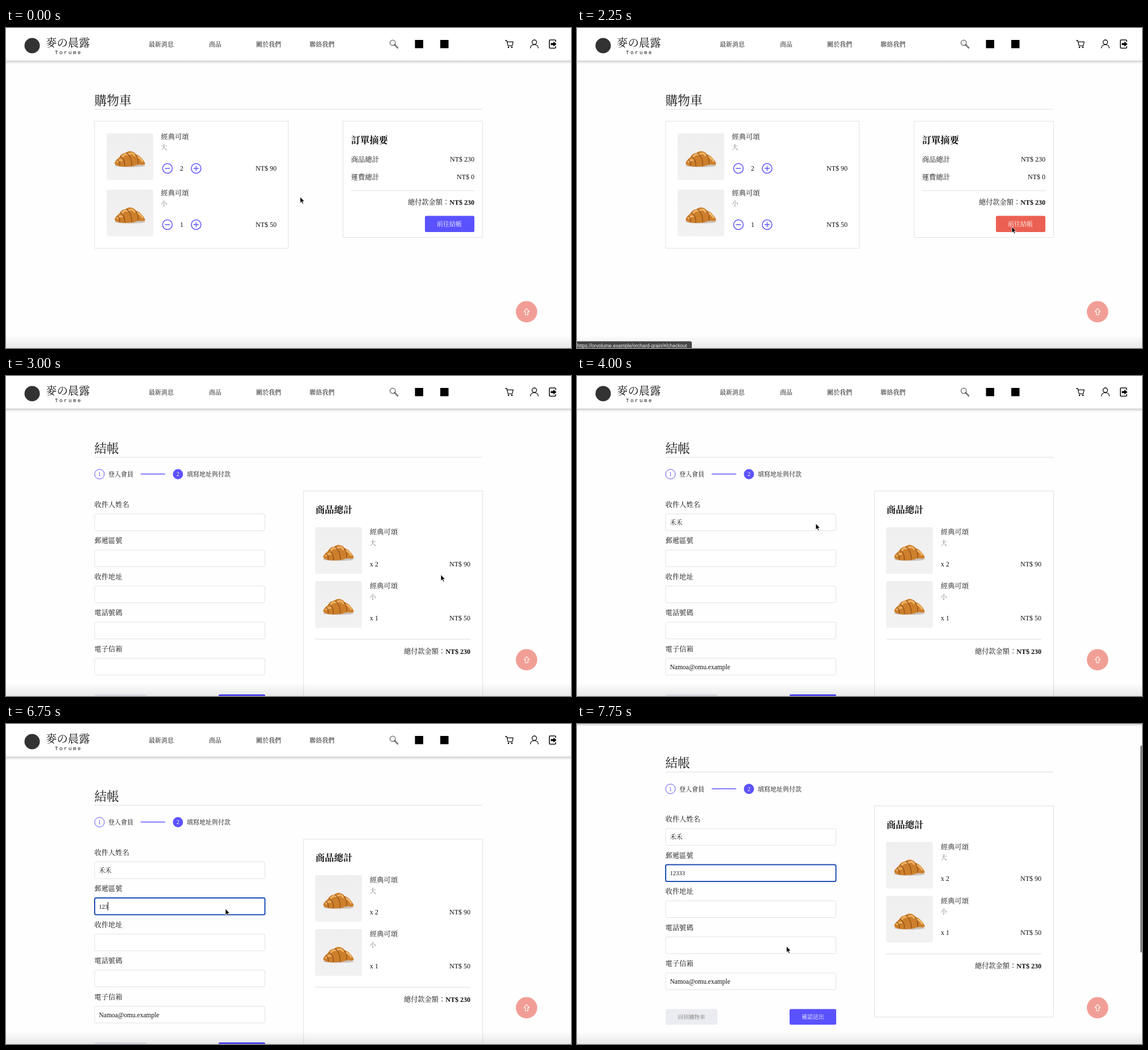
Recreate the animation shown at these times as an HTML page. Size 994 by 563 pixels, loop 8000 ms.

```html
<!DOCTYPE html>
<html lang="zh-Hant">
<head>
<meta charset="utf-8">
<title>購物車</title>
<style>
  html, body { margin: 0; width: 100%; height: 100%; overflow: hidden; background: #fefefe; }
  svg { display: block; font-family: 'Liberation Serif', 'Noto Serif CJK TC', 'Noto Sans CJK TC', 'Noto Sans CJK', serif; }
  text { white-space: pre; }
</style>
</head>
<body>
<svg id="stage" width="994" height="563" viewBox="0 0 994 563"></svg>
<script>
const PURPLE = '#5b52ff', CORAL = '#eb6052', BORDER = '#e2e2e2', INK = '#111';
const LOOP = 8000, SCROLL = 58.5;

// y is the vertical centre of the line of text
const text = (x, y, size, content, attrs = '') =>
  `<text x="${x}" y="${y + size * 0.36}" font-size="${size}" fill="${INK}" ${attrs}>${content}</text>`;
const right = (x, y, content, attrs = '') => text(x, y, 12, content, 'text-anchor="end" ' + attrs);
const middle = (x, y, size, content, color) =>
  text(x, y, size, content, `text-anchor="middle" style="fill:${color}"`);
const box = (x, y, w, h, fill, attrs = '') =>
  `<rect x="${x}" y="${y}" width="${w}" height="${h}" fill="${fill}" ${attrs}/>`;
const frame = (x, y, w, h, radius = 0, attrs = '') =>
  box(x, y, w, h, '#fff', `stroke="${BORDER}" rx="${radius}" ${attrs}`);
const rule = (x1, x2, y, color = '#dedede', width = 1) =>
  `<path d="M${x1} ${y}H${x2}" stroke="${color}" stroke-width="${width}"/>`;
const ring = (x, y, fill, width = 1) =>
  `<circle cx="${x}" cy="${y}" r="8.5" fill="${fill}" stroke="${PURPLE}" stroke-width="${width}"/>`;
const line = (d, width = 1.3, color = INK) =>
  `<path d="${d}" fill="none" stroke="${color}" stroke-width="${width}" stroke-linejoin="round" stroke-linecap="round"/>`;
const medium = 'font-weight="500"', bold = 'font-weight="600"';

const photo = (x, y) => `<g transform="translate(${x} ${y})">
  ${box(0, 0, 82, 82, 'url(#photo)', 'rx="3"')}
  <ellipse cx="41" cy="56.5" rx="27" ry="2.8" fill="#c9c2bc"/>
  <path d="M14 53C15 46 22 44 25 38C29 34 33 35 35 33C41 29 49 32 52 37C59 39 65 46 68 53C67 57 60 54 56 55C51 55 49 58 43 58C33 59 17 59 14 53Z" fill="#cd7f2b"/>
  <path d="M27 42Q30 36 36 37M38 37Q45 32 49 39M54 41Q60 43 63 49M19 50Q22 46 27 47" fill="none" stroke="#eeb467" stroke-width="3" stroke-linecap="round"/>
  <path d="M24 40Q33 46 32 58M35 34Q45 43 44 57M51 37Q57 46 55 54M19 46Q24 50 23 57" fill="none" stroke="#8d4b17" stroke-width="1.2"/>
</g>`;

const product = (x, y, size) =>
  text(x, y, 12.3, '經典可頌', medium) + text(x, y + 19, 11, size, 'style="fill:#777"');

const total = (x, y) =>
  text(x - 117, y, 12.2, '總付款金額：') + right(x, y, 'NT$ 230', bold);

const cartRow = (y, size, count, price) =>
  photo(177, y) + product(272.5, y + 6, size) +
  ring(284, y + 61.5, 'none', 1.5) + ring(334.5, y + 61.5, 'none', 1.5) +
  line(`M280 ${y + 61.5}h8M330.5 ${y + 61.5}h8m-4 -4v8`, 1.4, PURPLE) +
  middle(309, y + 61.5, 12, count, INK) + right(476, y + 61.5, price);

const checkoutRow = (y, size, count, price) =>
  photo(544, y) + product(640, y + 9, size) +
  text(640, y + 64.5, 12, 'x ' + count) + right(817, y + 64.5, price);

const heading = title => text(155.5, 127, 21.7, title) + rule(156, 838, 143);

const cartPage = heading('購物車') +
  frame(156, 164, 340.5, 223.5) +
  cartRow(185.5, '大', 2, 'NT$ 90') + cartRow(284.5, '小', 1, 'NT$ 50') +
  frame(593, 164, 245.5, 204.5) +
  text(607, 197, 16.3, '訂單摘要', bold) +
  text(607, 231.5, 12.3, '商品總計') + right(824, 231, 'NT$ 230') +
  text(607, 262.5, 12.3, '運費總計') + right(824, 262, 'NT$ 0') +
  rule(607, 824, 286) + total(824, 307) +
  box(737, 330.5, 87, 28.5, PURPLE, 'rx="2.5" id="pay"') + middle(780, 345, 11, '前往結帳', '#fff');

const fields = ['收件人姓名', '郵遞區號', '收件地址', '電話號碼', '電子信箱'].map((label, i) =>
  text(155.5, 226.5 + i * 63.5, 12.3, label) +
  frame(156, 242.5 + i * 63.5, 299.5, 29.5, 2.5, `id="field${i}"`)).join('');

const checkoutPage = heading('結帳') +
  ring(164.5, 172.7, 'none') + middle(164.5, 172.7, 10, 1, PURPLE) + text(180, 173.5, 11, '登入會員') +
  rule(237, 280, 172.5, PURPLE, 1.6) +
  ring(302.5, 172.7, PURPLE) + middle(302.5, 172.7, 10, 2, '#fff') + text(318, 173.5, 11, '填寫地址與付款') +
  fields +
  `<g id="autofill">${text(163.5, 258, 11, '禾禾') + text(163.5, 511.5, 11.5, 'Namoa@omu.example')}</g>` +
  text(163.5, 321, 10.5, '', 'id="zip"') + box(163, 313, 1, 15, INK, 'id="caret"') +
  frame(523.5, 202.5, 315, 371.5) + text(544.5, 235.5, 16.3, '商品總計', bold) +
  checkoutRow(266, '大', 2, 'NT$ 90') + checkoutRow(361, '小', 1, 'NT$ 50') +
  rule(544, 817, 463) + total(817, 484.5) +
  box(156, 560, 91, 27.5, '#ebebf2', 'rx="2.5"') + middle(201.5, 574.5, 9.6, '回到購物車', '#777') +
  box(374, 560, 82, 27.5, PURPLE, 'rx="2.5"') + middle(415, 574.5, 9.7, '確認送出', '#fff');

const header = box(0, 57, 994, 6, 'url(#shadow)') + box(0, 0, 994, 57.3, '#fff') +
  '<circle cx="46" cy="31" r="13.5" fill="#333"/>' +
  text(70, 26.5, 19.4, '麥の晨露', 'font-weight="300"') +
  text(86, 42.5, 9, 'Torume', `font-family="'Liberation Mono', monospace" letter-spacing="2.6"`) +
  [[251, '最新消息'], [357, '商品'], [440, '關於我們'], [534, '聯絡我們']]
    .map(([x, label]) => text(x, 29, 11, label)).join('') +
  '<circle cx="680.3" cy="26" r="4.7" fill="none" stroke="#555" stroke-width="1.2"/>' +
  line('M684 29.5L689 34.8', 2.6, '#555') + line('M685 30.5L688.6 34.3', 0.9, '#ddd') +
  box(719.5, 21, 14.5, 14.5, '#000') + box(764, 21, 14.5, 14.5, '#000') +
  line('M878.5 22H881L883.3 31.3H890.5L892.2 24.3H881.7') +
  '<circle cx="884" cy="34" r="1.3"/><circle cx="890" cy="34" r="1.3"/>' +
  line('M925.5 25a4 4 0 1 0 8 0a4 4 0 1 0 -8 0M922.6 35C923 27.5 936 27.5 936.4 35', 1.4) +
  line('M967 24V22.5Q967 21 965.5 21H957.5Q956 21 956 22.5V34Q956 35.5 957.5 35.5H965.5Q967 35.5 967 34V32.5', 1.6) +
  '<path d="M958.5 26.5H963V23.8L968.5 28.3L963 32.8V30H958.5Z"/>';

const gradient = (id, from, to) => `<linearGradient id="${id}" x2="0" y2="1">
  <stop stop-color="${from}"/><stop offset="1" stop-color="${to}"/></linearGradient>`;

const stage = document.getElementById('stage');
stage.innerHTML = `<defs>
    ${gradient('photo', '#f0efef', '#f3f2f2')}
    ${gradient('shadow', 'rgba(0,0,0,.2)', 'rgba(0,0,0,0)')}
    ${gradient('floor', 'rgba(0,0,0,0)', 'rgba(0,0,0,.085)')}
  </defs>
  <g id="page"><g id="cart">${cartPage}</g><g id="checkout">${checkoutPage}</g>${header}</g>
  ${box(0, 540, 994, 23, 'url(#floor)')}
  <circle cx="915.8" cy="499.2" r="18.8" fill="#f19f96"/>
  ${line('M916 493.7L920.7 499H918.2V504.5H913.8V499H911.3Z', 1.1, '#fff')}
  ${box(991, 38, 6, 364, '#858585', 'rx="2" id="scrollbar"')}
  <g id="status">${box(-4, 551.3, 206, 16, '#454545', 'rx="3"')}
    ${text(0, 559, 8.6, 'https://orvolume.example/orchard-grain/#/checkout',
      `font-family="'Liberation Sans', sans-serif" style="fill:#f2f2f2"`)}</g>
  <path id="cursor" d="M0 0V11L2.5 8.7L4.2 12.5L6 11.7L4.3 8H7.7Z" stroke="#fff" stroke-width=".8"/>`;

const el = Object.fromEntries([...stage.querySelectorAll('[id]')].map(node => [node.id, node]));

const cursorSteps = [
  [0, 517.5, 297], [1250, 540, 294], [1500, 730, 293], [1750, 767, 330], [2000, 765, 349.5],
  [3250, 653, 352], [3500, 505, 325], [3750, 438, 284], [4000, 420, 259.5], [4250, 397, 297],
  [4500, 386, 325], [7500, 368.5, 391]];
const typingSteps = [[0, ''], [6000, '1'], [6250, '12'], [6750, '123'], [7000, '12333']];
const statusSteps = [[0, 0], [2250, 1], [2750, 0.4], [3000, 0]];

const stepAt = (steps, t) => steps.filter(([start]) => t >= start).pop().slice(1);
const show = (node, visible) => node.setAttribute('display', visible ? 'inline' : 'none');

function render(now) {
  const t = now % LOOP;
  const scrolled = t >= 7750, focused = t >= 4750;
  const [typed] = stepAt(typingSteps, t);

  show(el.cart, t < 2500);
  show(el.checkout, t >= 2500);
  show(el.autofill, t >= 3500);
  show(el.caret, focused && t < 7500 && !(t >= 5250 && t < 5750));
  show(el.scrollbar, scrolled);
  el.pay.setAttribute('fill', t >= 2000 ? CORAL : PURPLE);
  el.field1.setAttribute('stroke', focused ? '#1b4db3' : BORDER);
  el.field1.setAttribute('stroke-width', focused ? 2 : 1);
  el.zip.textContent = typed;
  el.caret.setAttribute('x', 163 + typed.length * 5.25);
  el.status.setAttribute('opacity', stepAt(statusSteps, t)[0]);
  el.page.setAttribute('transform', `translate(0 ${scrolled ? -SCROLL : 0})`);
  el.cursor.setAttribute('transform', `translate(${stepAt(cursorSteps, t)})`);
  requestAnimationFrame(render);
}
requestAnimationFrame(render);
</script>
</body>
</html>
```
